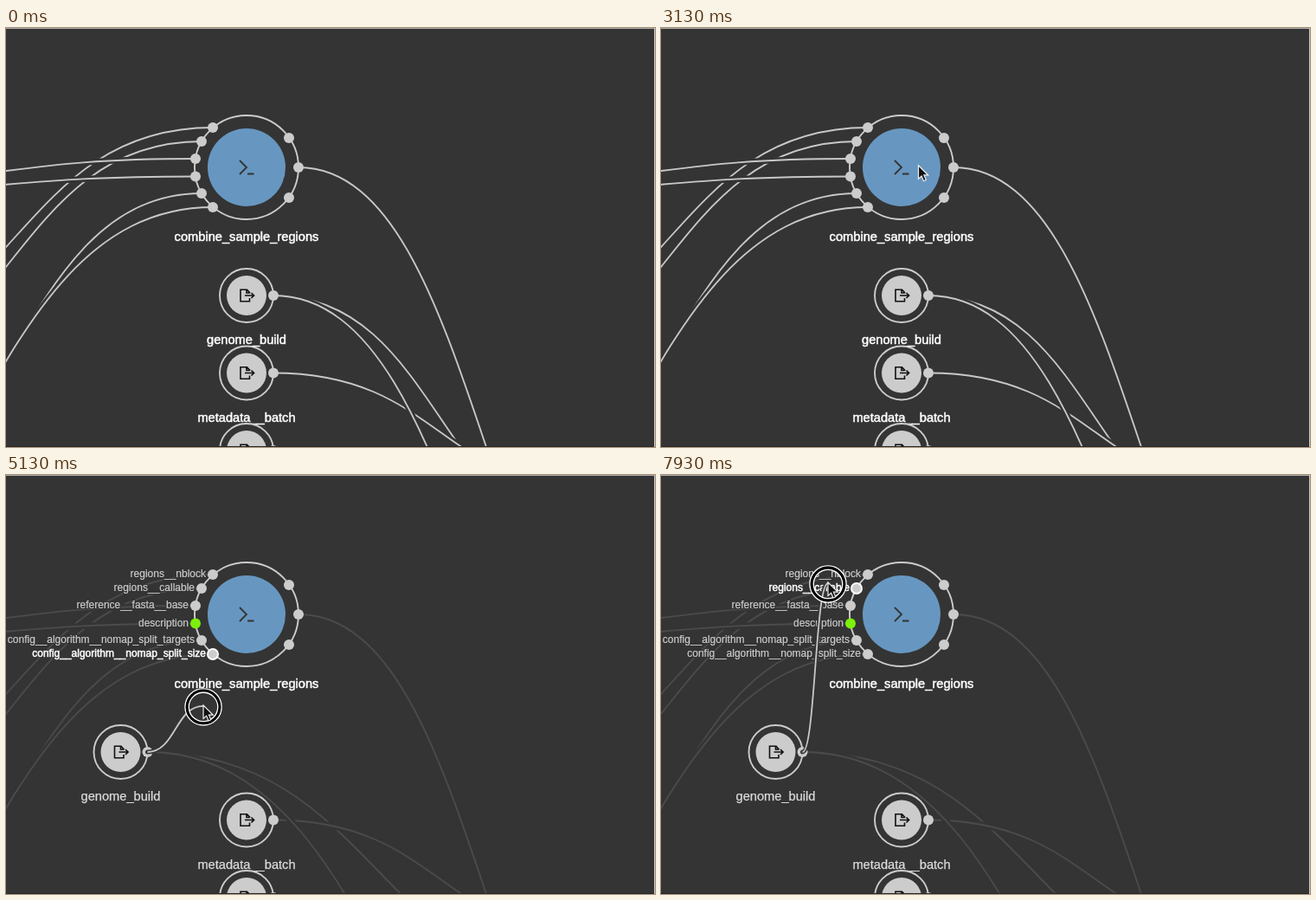
Recreate the animation shown at these times as an HTML page. Size 750 by 484 pixels, loop 8 s.

```html
<!DOCTYPE html>
<html lang="en">
<head>
<meta charset="utf-8">
<title>Workflow graph</title>
<style>
html, body { margin: 0; width: 100%; height: 100%; overflow: hidden; background: #343434; }
svg { display: block; width: 750px; height: 484px; }
text { font: 14.65px "Liberation Sans", Arial, sans-serif; fill: #fff; stroke: #fff; stroke-width: .5px; }
path { fill: none; }
.halo { stroke: #343434; stroke-width: 7; }
.line { stroke: #c8c8c8; stroke-width: 1.8; }
.ring { fill: #343434; stroke: #ccc; stroke-width: 1.9; }
.disc { fill: #ccc; }
.tool .disc { fill: #6797c1; }
.port { fill: #ccc; }
.icon { stroke: #111; stroke-width: 1.6; }
.tool .icon { stroke: #333; stroke-width: 1.8; }
.name { text-anchor: middle; }
.small text { font-size: 12px; fill: #ccc; stroke: #ccc; stroke-width: .2px; }
.small .under { stroke: #343434; stroke-width: 2.5px; }
.small.hot text:last-child { fill: #fff; stroke: #fff; stroke-width: .5px; }
.in { text-anchor: end; }
.port.hot { stroke: #fff; stroke-width: 2; }
.port.match { fill: #7cf00a; }
.dim .line { stroke: #4b4b4b; }
.dim .ring { stroke: #4c4c4c; }
.dim .port { fill: #545454; }
.dim .disc { fill: #8b8b8b; }
.dim.tool .disc { fill: #436d91; }
.dim .name { fill: #909090; stroke: #909090; stroke-width: .15px; }
.soft .name { fill: #ddd; stroke: #ddd; stroke-width: .25px; }
.focus .ring { stroke: #5a9bd8; }
.focus .line { stroke: #dedede; }
.link .halo { stroke-width: 5; stroke-linecap: round; }
</style>
</head>
<body>
<svg id="stage" viewBox="0 0 750 484" xmlns="http://www.w3.org/2000/svg"></svg>
<script>
const LOOP = 8000;
const stage = document.getElementById('stage');

function add(parent, tag, attrs = {}, text) {
  const el = document.createElementNS(stage.namespaceURI, tag);
  for (const key in attrs) el.setAttribute(key, attrs[key]);
  if (text) el.textContent = text;
  parent.append(el);
  return el;
}
const group = (cls = '', parent = stage) => add(parent, 'g', { class: cls });
const circle = (parent, cls, cx, cy, r) => add(parent, 'circle', { class: cls, cx, cy, r });
const show = (el, on) => el.setAttribute('display', on ? 'inline' : 'none');
const place = (el, x, y) => el.setAttribute('transform', `translate(${x} ${y})`);
const mix = (a, b, k) => a + (b - a) * Math.min(1, Math.max(0, k));

function curve(x1, y1, x2, y2) {
  const mid = (x1 + x2) / 2;
  return `M${x1} ${y1}C${mid} ${y1} ${mid} ${y2} ${x2} ${y2}`;
}

// Every connection is a light line over a dark halo.
function makeEdge(d = '', cls) {
  const el = group(cls);
  const parts = ['halo', 'line'].map(name => add(el, 'path', { class: name }));
  const set = value => parts.forEach(p => p.setAttribute('d', value));
  set(d);
  return { el, set };
}

// Port label: a dark outline under the lettering.
function makeLabel(parent, cls, x, y, text) {
  const el = group('small ' + cls, parent);
  add(el, 'text', { class: 'under', x, y }, text);
  add(el, 'text', { x, y }, text);
  return el;
}

// name, port position, far end of its connection
const inputs = [
  ['regions__nblock', 239, 115, -218, 368],
  ['regions__callable', 226, 131, -218, 411],
  ['reference__fasta__base', 219, 151, -218, 179],
  ['description', 219, 171.5, -218, 190],
  ['config__algorithm__nomap_split_targets', 226, 191, -218, 568],
  ['config__algorithm__nomap_split_size', 239, 207, -325, 713]
];

const edges = inputs.map(([, ...ends]) => makeEdge(curve(...ends)));
edges.push(makeEdge(curve(338, 161, 772, 807)));
const edgeB = makeEdge();
edges.push(makeEdge(curve(309, 398.5, 699, 538)));
const edgeA = makeEdge();

const tool = group('tool');
circle(tool, 'ring', 278, 161, 60);
circle(tool, 'disc', 278, 161, 45);
add(tool, 'path', { class: 'icon', d: 'M270 153L278 161L270 169M279 168.5H286.5' });
const ports = inputs.map(([, x, y]) => circle(tool, 'port', x, y, 6));
[[327, 127], [338, 161], [327, 196]].forEach(([x, y]) => circle(tool, 'port', x, y, 6));
add(tool, 'text', { class: 'name', x: 278, y: 246 }, 'combine_sample_regions');

function makeInput(name, x, y) {
  const el = group();
  circle(el, 'ring', 0, 0, 31);
  circle(el, 'disc', 0, 0, 23);
  add(el, 'path', { class: 'icon', d: 'M3.5 -2.5V-3.5L.5 -6.7H-7V6.7H3.5V3M0 -6.7V-3H3.5M-2 0H8.5M5.5 -3L8.6 0L5.5 3' });
  circle(el, 'port', 31, 0, 6);
  add(el, 'text', { class: 'name', x: 0, y: 56 }, name);
  place(el, x, y);
  return el;
}
const metadata = makeInput('metadata__batch', 278, 398.5);
const lower = makeInput('', 278, 488);
const genome = makeInput('genome_build', 278, 309);
const hoverLabel = makeLabel(genome, 'hot', 39, 3, 'genome_build');

const labels = group();
const names = inputs.map(([name, x, y]) => makeLabel(labels, 'in', x - 8, y + 3, name));

const link = makeEdge('', 'link');

const press = group();
const rings = [['#fff', 1.5, 0], ['#000', 3.2, -2.2], ['#fff', 1.3, -4.3]].map(([stroke, width, inset]) => ({
  inset,
  el: add(press, 'circle', { fill: 'none', stroke, 'stroke-width': width })
}));

const pointer = group();
const arrow = add(pointer, 'path', {
  d: 'M0 0V15.5L3.6 12.2L6 18L8.8 16.8L6.4 11.2H11.2Z',
  style: 'fill:#111;stroke:#eee;stroke-width:1.2'
});
const hand = add(pointer, 'path', {
  d: 'M-2 1Q0 -2 1.4 1L2.5 6Q4 4.5 5 6.3Q6.6 5.2 7.4 7Q9.4 6.4 9.4 9L8.6 13V17H1V14.5L-4.5 9Q-5 6.5 -2.5 7.8L-.6 9Z',
  style: 'fill:#fff;stroke:#111;stroke-width:1.1'
});

// time, x, y of the pointer tip
const track = [
  [0, 256, 157], [330, 256, 157], [600, 300, 235], [800, 368, 330], [1130, 320, 460],
  [1400, 296, 430], [1650, 285, 345], [2000, 298, 318], [2070, 308, 314],
  [2130, 336, 268], [2200, 318, 200], [2330, 262, 122], [2470, 262, 122],
  [2900, 300, 160], [3270, 296, 158], [3390, 281.5, 306], [3670, 137.5, 316],
  [3730, 136, 317], [4130, 166, 320], [4400, 166, 320], [4750, 196, 300],
  [5130, 228, 266], [5400, 240, 256], [5750, 235, 235], [6000, 222, 228],
  [6200, 212, 198], [6600, 195, 176], [7000, 184, 161], [7130, 183, 159],
  [7450, 186, 142], [7750, 191, 126], [7930, 193, 124], [8000, 193, 124]
];

function pointerAt(t) {
  const i = Math.max(1, track.findIndex(key => key[0] > t));
  const [a, b] = [track[i - 1], track[i]];
  const k = (t - a[0]) / (b[0] - a[0]);
  return [mix(a[1], b[1], k), mix(a[2], b[2], k)];
}

function drawPress(t, x, y) {
  const first = t < 4000;
  const start = first ? 3340 : 4200;
  const end = first ? 3600 : Infinity;
  show(press, t >= start && t < end + 140);
  const r = t < end ? mix(32, 21, (t - start) / 130) : mix(21, 31, (t - end) / 70);
  press.setAttribute('opacity', t < end ? mix(.3, 1, (t - start) / 100) : mix(1, 0, (t - end - 75) / 65));
  place(press, x, y + 2);
  rings.forEach(ring => ring.el.setAttribute('r', r + ring.inset));
}

const nearest = t => t < 6250 ? 5 : t < 6700 ? 4 : t < 7165 ? 3 : t < 7900 ? 2 : 1;

function draw(t) {
  const [x, y] = pointerAt(t);
  const focus = t >= 1600 && t < 2470;
  const linking = t >= 4470;

  const [dragX, dragY] = pointerAt(Math.min(3730, Math.max(3390, t)));
  const gx = dragX - 3.5, gy = dragY + 3;
  place(genome, gx, gy);
  edgeA.set(curve(gx + 31, gy, 779, 952));
  edgeB.set(curve(gx + 31, gy, 697, 595));

  edges.forEach(e => e.el.classList.toggle('dim', focus || linking));
  for (const e of [edgeA, edgeB]) {
    e.el.classList.toggle('focus', focus);
    e.el.classList.toggle('dim', linking);
  }
  for (const node of [tool, metadata, lower]) node.classList.toggle('dim', focus);
  genome.classList.toggle('focus', focus);
  for (const node of [genome, metadata]) node.classList.toggle('soft', linking);
  show(hoverLabel, focus || (t >= 3360 && !linking));

  show(labels, linking);
  show(link.el, linking);
  link.set(curve(gx + 31, gy, x, y + 1));
  const hot = nearest(t);
  const hotPort = t >= 7065 && t < 7165 ? 2 : hot;
  names.forEach((el, i) => el.classList.toggle('hot', i === hot));
  ports.forEach((el, i) => {
    el.classList.toggle('hot', linking && i === hotPort);
    el.classList.toggle('match', linking && i === 3);
  });

  drawPress(t, x, y);
  show(pointer, t >= 70);
  const grab = t < 400 || (t >= 1700 && t < 2080) || (t >= 3330 && t < 4470);
  show(hand, grab);
  show(arrow, !grab);
  place(pointer, x, y);
}

add(stage, 'rect', { width: 750, height: 1, fill: '#aaa' });
add(stage, 'rect', { x: 749, width: 1, height: 484, fill: '#ccc' });
add(stage, 'rect', { y: 483, width: 749, height: 1, fill: '#262626' });

const origin = performance.now();
function tick() {
  draw((performance.now() - origin) % LOOP);
  requestAnimationFrame(tick);
}
tick();
</script>
</body>
</html>
```
